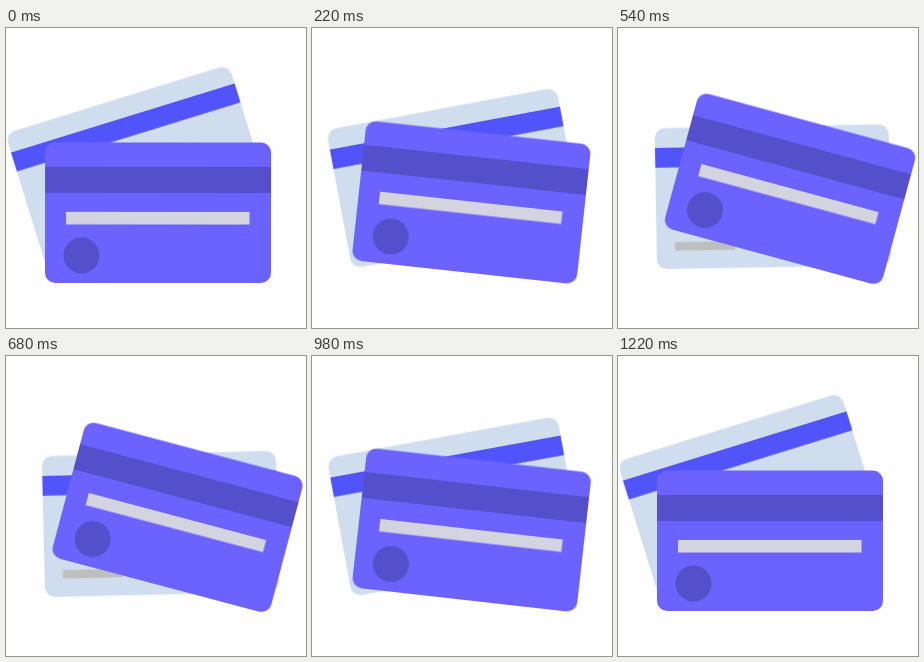
An HTML page without scripts that plays this animation: 300x300 px, repeating every 1.26 s.

```html
<!DOCTYPE html>
<html lang="en">
<head>
<meta charset="utf-8">
<title>Two cards</title>
<style>
  html, body { margin: 0; width: 100%; height: 100%; overflow: hidden; background: #fefefe; }
  svg { display: block; width: 100%; height: 100%; }

  .card { animation: swing 1260ms linear infinite; }
  .back { --from: -17.2deg; --to: .95deg; transform-origin: 37px 234.5px; }
  .front { --from: 0deg; --to: 17deg; transform-origin: 251.5px 248px; }

  /* Linear out and back, then a short rest */
  @keyframes swing {
    0%, 96.03%, 100% { transform: rotate(var(--from)); }
    48.02% { transform: rotate(var(--to)); }
  }
</style>
</head>
<body>
<svg viewBox="0 0 300 300">
  <g class="card back">
    <rect x="38.9" y="100.2" width="234" height="141" rx="10" fill="#d0ddee"/>
    <rect x="38.9" y="120" width="234" height="19.8" fill="#5054fa"/>
    <rect x="57.3" y="214.5" width="60" height="8.5" fill="#bebebe"/>
  </g>
  <g class="card front">
    <rect x="39" y="114.5" width="226" height="140.5" rx="10" fill="#6c63ff"/>
    <rect x="39" y="139" width="226" height="26" fill="#564fcc"/>
    <rect x="60" y="184" width="183.5" height="12.5" fill="#d4d4e1"/>
    <circle cx="75.5" cy="227.5" r="18" fill="#564fcc"/>
  </g>
</svg>
</body>
</html>
```
